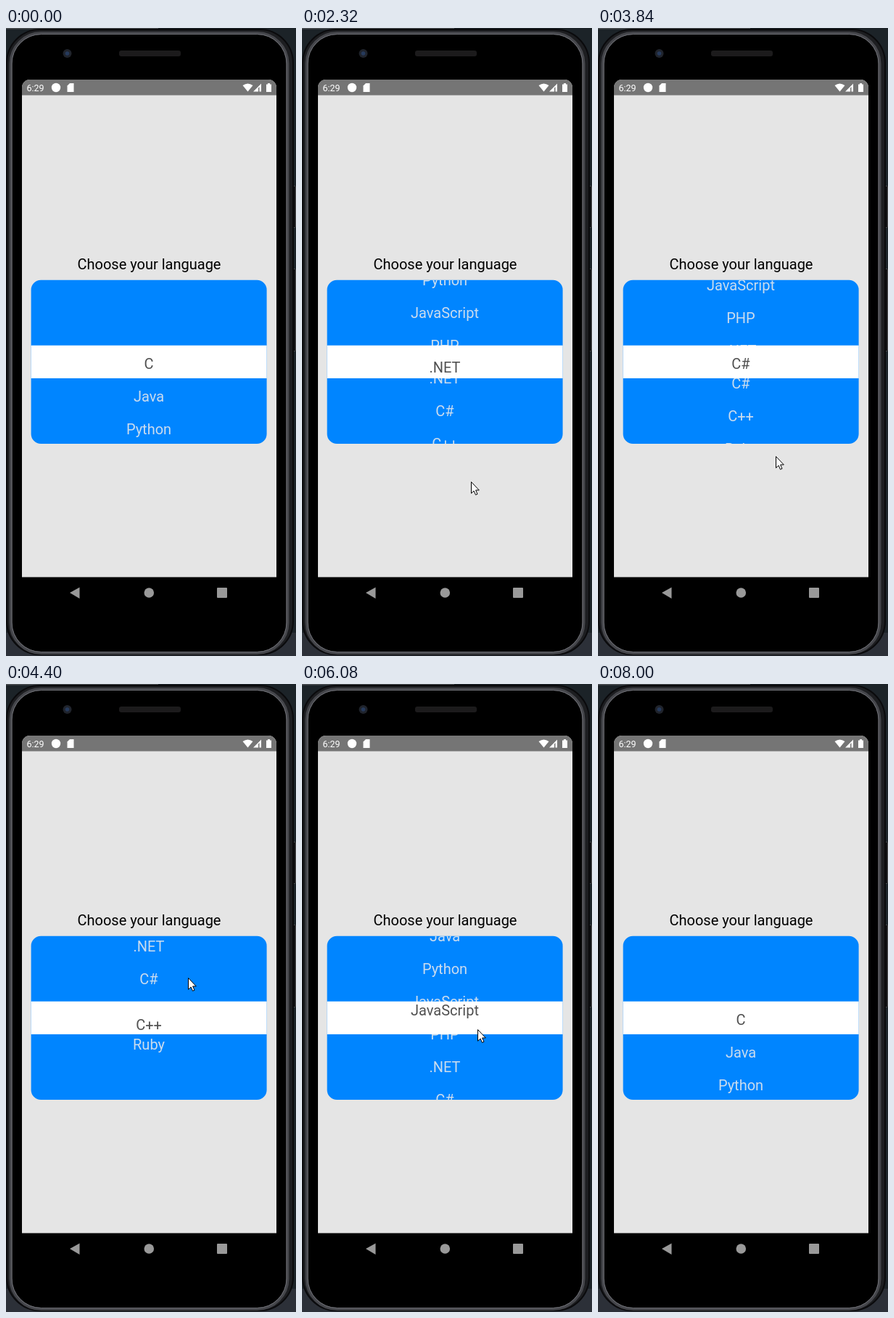
Animation, 400 px wide and 864 px high, one loop 9 s. Source, as an HTML page:

```html
<!DOCTYPE html>
<html lang="en">
<head>
<meta charset="utf-8">
<title>Language picker</title>
<style>
html, body { margin: 0; width: 100%; height: 100%; overflow: hidden; background: #1c2328; }
svg { display: block; width: 100%; height: 100%; font-family: Roboto, sans-serif; }
.list { font-size: 20px; text-anchor: middle; }
</style>
</head>
<body>
<svg viewBox="0 0 400 864">
  <defs>
    <clipPath id="panel"><rect x="34.600" y="346.700" width="325" height="225.300" rx="13.500"/></clipPath>
    <clipPath id="band"><rect x="34.600" y="436.700" width="325" height="45.200"/></clipPath>
  </defs>

  <!-- phone -->
  <rect width="400" height="864" fill="#1c2328"/>
  <rect y="832" width="400" height="32" fill="#2c3038"/>
  <rect width="210" height="1.500" fill="#4a4e52"/>
  <g fill="#101113" stroke="#4a4a4c">
    <rect x="393.500" y="217.500" width="6" height="57" rx="1"/>
    <rect x="393.500" y="331.500" width="6" height="113" rx="1"/>
  </g>
  <rect y="615" width="3" height="38" fill="#050505"/>
  <rect x="1" y="2" width="395" height="860" rx="46" fill="#1d1e21" stroke="#0a0a0c" stroke-width="2"/>
  <rect x="6.500" y="7" width="382" height="853" rx="42" fill="#000" stroke="#45464b" stroke-width="4"/>
  <rect x="8" y="8.500" width="379" height="850" rx="40.500" fill="none" stroke="#707177"/>
  <rect x="156" y="31" width="85" height="8" rx="3" fill="#1c1b1c"/>
  <circle cx="84.500" cy="35" r="6" fill="#20242c"/>
  <circle cx="84.500" cy="35" r="2.800" fill="#263a5c"/>

  <!-- screen -->
  <path d="M22 755.600V82a11 11 0 0 1 11-11H362a11 11 0 0 1 11 11V755.600Z" fill="#e5e5e5"/>
  <path d="M22 92.400V82a11 11 0 0 1 11-11H362a11 11 0 0 1 11 11V92.400Z" fill="#757575"/>
  <g fill="#fff">
    <text x="28.500" y="86.500" font-size="12.500">6:29</text>
    <circle cx="69" cy="82" r="6.200"/>
    <path d="M88 76h5.500v12h-9v-8.500Z"/>
    <path d="M326.500 79q7-5 14 0l-7 8.500Z"/>
    <path d="M341 87.500L352 76.500V87.500H349.500V81L348 82.500V87.500Z"/>
    <path d="M359 77.500h2V76h3v1.500h2V88h-7Z"/>
  </g>
  <g fill="#999">
    <path d="M88 777L101.500 769.500V785Z"/>
    <circle cx="197.300" cy="777" r="6.800"/>
    <rect x="291" y="770" width="14" height="14" rx="1"/>
  </g>

  <!-- picker -->
  <text class="list" x="197.500" y="332.300" fill="#000">Choose your language</text>
  <g clip-path="url(#panel)">
    <rect x="34" y="346" width="326" height="227" fill="#0085ff"/>
    <g id="back" class="list" fill="#cbdcee"></g>
    <rect x="34" y="436.700" width="326" height="45.200" fill="#fff"/>
  </g>
  <g clip-path="url(#band)"><g id="front" class="list" fill="#505050"></g></g>

  <path id="cursor" d="M.5 .5V16.200L4.100 12.900 6.500 18.300 9 17.200 6.600 11.900H11.300Z"
    fill="#fff" stroke="#000" stroke-linejoin="round"/>
</svg>
<script>
const LOOP = 9000, STEP = 40, ROW = 45;
const SWIPE = 600, HOLD = SWIPE / 2, LAG = 60;
const names = ['C', 'Java', 'Python', 'JavaScript', 'PHP', '.NET', 'C#', 'C++', 'Ruby'];
const byId = id => document.getElementById(id);
const back = byId('back'), front = byId('front'), cursor = byId('cursor');

for (const list of [back, front]) {
  list.innerHTML = names.map((name, i) =>
    `<text x="197" y="${468.7 + ROW * i}">${name}</text>`).join('');
}

// Each gesture starts at a time and place and scrolls to a row
const gestures = [
  { at: 40, x: 392, y: 808, row: 0 },
  { at: 400, x: 235, y: 600, row: 0 },
  { at: 1831, x: 235, y: 600, row: 5 },
  { at: 2440, x: 232, y: 693, row: 8 },
  { at: 3095, x: 229, y: 539, row: 4 },
  { at: 3600, x: 245, y: 640, row: 8 },
  { at: 4205, x: 251, y: 370, row: 5 },
  { at: 4940, x: 235, y: 355, row: 4 },
  { at: 5898, x: 242, y: 455, row: 2 },
  { at: 6960, x: 246, y: 400, row: 0 },
  { at: 7640, x: 394, y: 712, row: 0 }
];
const first = gestures[0], last = gestures[gestures.length - 1];

const mix = (a, b, u) => a + (b - a) * u;
function ease(u) {
  u = Math.min(1, Math.max(0, u));
  return u * u * (3 - 2 * u);
}

function offsetAt(t) {
  return gestures.reduce((px, g) => mix(px, g.row * ROW, ease((t - g.at) / SWIPE)), 0);
}

// The pointer drags with the list, then glides to the next gesture
function pointerAt(t) {
  const i = Math.max(0, gestures.findLastIndex(g => g.at <= t));
  const g = gestures[i], next = gestures[i + 1] || g;
  const hold = i && g.row !== gestures[i - 1].row ? HOLD : 0;
  const dragged = offsetAt(g.at) - offsetAt(Math.min(t, g.at + hold));
  const u = ease((t - g.at - hold) / (next.at - g.at - hold || 1));
  return [mix(g.x, next.x, u), mix(g.y + dragged, next.y, u)];
}

function move(el, x, y) {
  el.setAttribute('transform', `translate(${Math.round(x)} ${Math.round(y)})`);
}

function draw(time) {
  const t = Math.floor(time % LOOP / STEP) * STEP;
  move(back, 0, -offsetAt(t));
  move(front, 0, -offsetAt(t + LAG));
  move(cursor, ...pointerAt(t));
  cursor.style.display = t >= first.at && t < last.at ? '' : 'none';
}

const start = performance.now();
function tick() {
  draw(performance.now() - start);
  requestAnimationFrame(tick);
}
tick();
</script>
</body>
</html>
```
